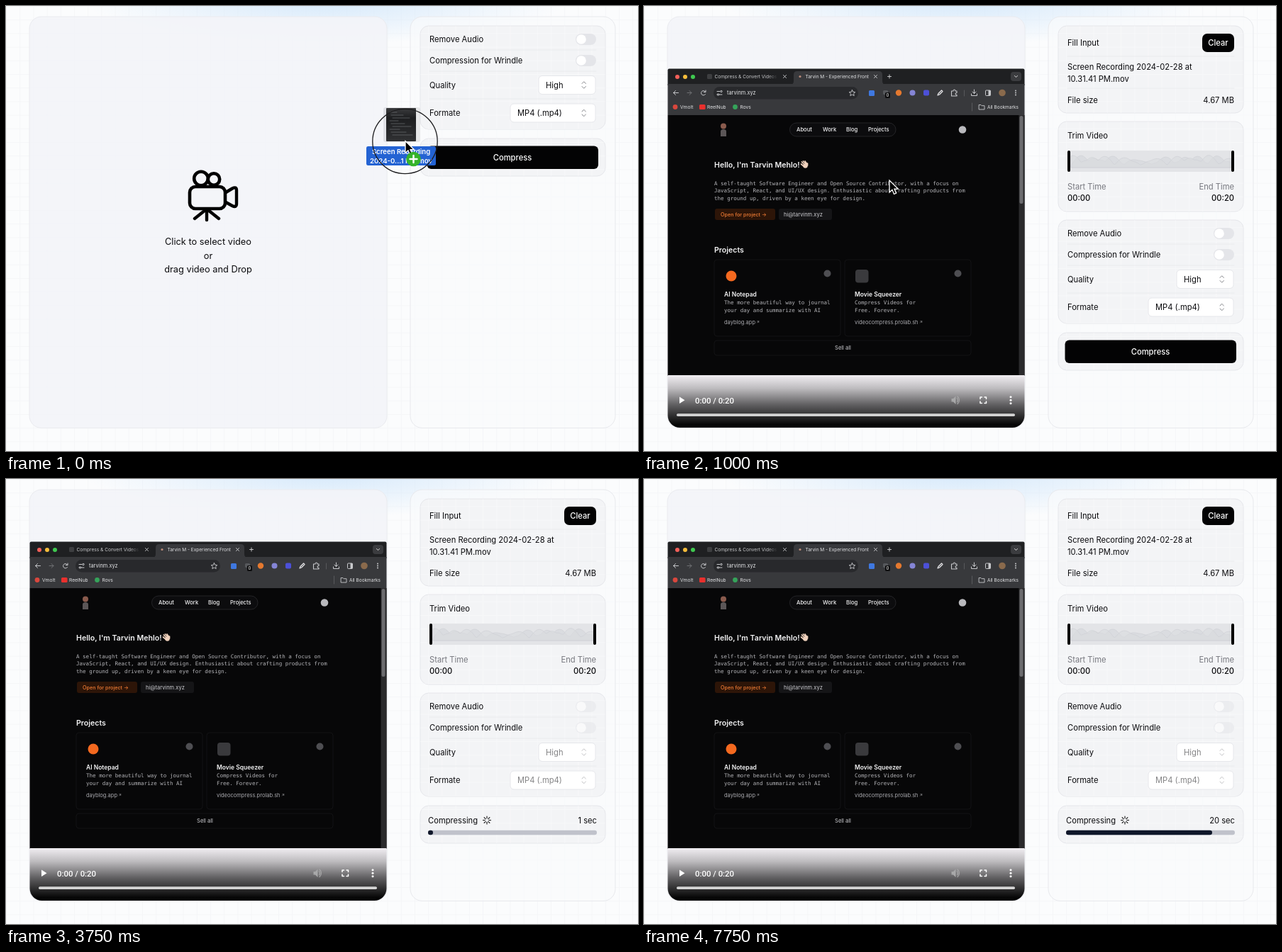
Recreate the animation shown at these times as an HTML page. Size 891x628 px, loop 8 s.

```html
<!DOCTYPE html>
<html lang="en">
<head>
<meta charset="utf-8">
<title>Video compressor</title>
<style>
  html, body { margin: 0; width: 100%; height: 100%; overflow: hidden; background: #fbfcfd; }
  svg { display: block; }
  text { font-family: Inter, sans-serif; white-space: pre; }
  .mono { font-family: "DejaVu Sans Mono", monospace; }
  .roboto { font-family: Roboto, sans-serif; }
</style>
</head>
<body>
<svg id="stage" width="891" height="628" viewBox="0 0 891 628"></svg>
<script>
const STEP = 250, LOOP = 8000;
const stage = document.getElementById('stage');

// Drawing helpers; text is placed by its vertical centre.
const attrs = o => Object.entries(o).map(([k, v]) => `${k}="${v}"`).join(' ');
const text = (x, y, str, size = 11.2, o = {}) =>
  `<text x="${x}" y="${y + size * .36}" font-size="${size}" ${attrs({ fill: '#0b0b0e', ...o })}>${str.replace(/&/g, '&amp;')}</text>`;
const box = (x, y, x2, y2, r, fill, o = {}) =>
  `<rect x="${x}" y="${y}" width="${x2 - x}" height="${y2 - y}" rx="${r}" fill="${fill}" ${attrs(o)}/>`;
const dot = (x, y, r, fill, o = {}) => `<circle cx="${x}" cy="${y}" r="${r}" fill="${fill}" ${attrs(o)}/>`;
const line = (d, stroke = '#c8c9cc', width = 1, o = {}) =>
  `<path d="${d}" fill="none" stroke="${stroke}" stroke-width="${width}" stroke-linecap="round" stroke-linejoin="round" ${attrs(o)}/>`;
const group = (id, body, o = {}) => `<g id="${id}" ${attrs(o)}>${body}</g>`;
const rule = y => line(`M597 ${y}H832`, '#e6e7ea', .8);
const card = (y, y2) => box(584, y, 845, y2, 12, '#f3f4f6', { 'fill-opacity': .85, stroke: '#e6e7eb' }) +
  box(584, y, 845, y2, 12, 'url(#cardGrid)');
const end = { 'text-anchor': 'end' }, middle = { 'text-anchor': 'middle' };
const semi = { 'font-weight': 600 }, medium = { 'font-weight': 500 };

const defs = `<defs>
  <radialGradient id="sky"><stop stop-color="#d6e9fb"/><stop offset="1" stop-color="#d6e9fb" stop-opacity="0"/></radialGradient>
  <radialGradient id="glow" cx=".5" cy="1.1" r=".3" gradientTransform="translate(0 .2)">
    <stop stop-color="#55565a"/><stop offset="1" stop-color="#030304"/></radialGradient>
  <linearGradient id="fade" x2="0" y2="1"><stop stop-color="#f1eef2"/><stop offset=".25" stop-color="#bdbbbe"/>
    <stop offset=".55" stop-color="#626163"/><stop offset=".93" stop-color="#060606"/><stop offset="1"/></linearGradient>
  <linearGradient id="thumb" x2="0" y2="1"><stop stop-color="#3b3c3e"/><stop offset=".3" stop-color="#1d1e20"/><stop offset="1" stop-color="#303133"/></linearGradient>
  <linearGradient id="tabFade"><stop offset=".85" stop-color="#1f2022" stop-opacity="0"/><stop offset="1" stop-color="#1f2022"/></linearGradient>
  <pattern id="grid" width="19.2" height="19.2" patternUnits="userSpaceOnUse"><path d="M0 .5H19.2M.5 0V19.2" stroke="#f5f6f8"/></pattern>
  <pattern id="cardGrid" width="19.2" height="19.2" patternUnits="userSpaceOnUse"><path d="M0 .5H19.2M.5 0V19.2" stroke="#fff" stroke-opacity=".35"/></pattern>
  <clipPath id="player">${box(33.5, 88.5, 536.5, 595, 17, '#000')}${box(33.5, 88.5, 536.5, 560, 2, '#000')}</clipPath>
</defs>`;

const page = box(0, 0, 891, 628, 0, '#fbfcfd') + box(0, 0, 891, 628, 0, 'url(#grid)') +
  '<ellipse cx="450" cy="-8" rx="340" ry="62" fill="url(#sky)"/>' +
  box(33, 15, 537, 595.5, 17, '#f4f5f9', { 'fill-opacity': .93, stroke: '#eaebef' }) +
  box(570, 15, 859, 595.5, 17, '#fafbfd', { 'fill-opacity': .7, stroke: '#e8e9ed' });

const dropZone = dot(275, 243.5, 9.8, 'none', { stroke: '#000', 'stroke-width': 4.6 }) +
  dot(293, 244.5, 8.2, 'none', { stroke: '#000', 'stroke-width': 4.6 }) +
  box(259, 255, 309, 286, 8, '#f4f5f9', { stroke: '#000', 'stroke-width': 4.6 }) +
  line('M310 263L319 257.500Q325 254.500 325 260V279Q325 285 319 282L310 277M283 287V302M281 288L266 300M285 288L300 300', '#000', 4.4) +
  text(285, 332, 'Click to select video', 12.8, middle) +
  text(285, 352, 'or', 12.8, middle) + text(285, 371, 'drag video and Drop', 12.8, middle);

const toggle = y => `<g class="dim">${box(803, y - 8, 832, y + 8, 8, '#e4e5e9')}${dot(811, y, 6.8, '#fff')}</g>`;
const select = (x, y, label) => box(x, y - 13, 831, y + 13, 5, '#fff', { stroke: '#e6e7eb' }) +
  `<g class="dim">${text(x + 10, y, label)}${line(`M812 ${y - 2}l2.700 -2.700 2.700 2.700M812 ${y + 2}l2.700 2.700 2.700 -2.700`, '#77787d', .9)}</g>`;
const settings = card(28, 174) + rule(62) + rule(92) + rule(131) +
  text(597, 47, 'Remove Audio') + toggle(47) +
  text(597, 77, 'Compression for Wrindle') + toggle(77) +
  text(597, 111.5, 'Quality') + select(751, 111.5, 'High') +
  text(597, 151, 'Formate') + select(711, 151, 'MP4 (.mp4)') + card(187, 240);
const button = box(593.5, 197.5, 835, 230, 6, 'url(#glow)') +
  text(714, 214, 'Compress', 11.2, { fill: '#fff', ...medium, ...middle });
const spokes = Array.from({ length: 8 }, (_, i) => line('M0 -2.700V-5.500', '#111', 1.1, { transform: `rotate(${i * 45})` })).join('');
const progress = text(595, 207.5, 'Compressing') +
  `<g transform="translate(678 207.500)">${group('spinner', spokes)}</g>` +
  text(833, 207.5, '0 sec', 11.2, { id: 'seconds', ...end }) +
  box(595, 221.7, 833, 228.3, 3.3, '#c0c2cb') + box(595, 221.7, 596, 228.3, 3.3, '#0f172a', { id: 'bar' });

const wave = (phase, color) => {
  let d = 'M602 228';
  for (let x = 0; x <= 226; x += 2)
    d += `L${602 + x} ${(225 - 7 * Math.abs(Math.sin(x * .083 + phase)) - 8 * Math.abs(Math.sin(x * .13 + phase) * Math.sin(x * .021 + 1))).toFixed(1)}`;
  return `<path d="${d}L828 228Z" fill="${color}" fill-opacity=".6" stroke="#cdcfd4" stroke-width=".6"/>`;
};
const details = card(28, 151) + rule(71) + rule(116) + text(597, 51.5, 'Fill Input') +
  box(787, 39, 832, 65, 7, 'url(#glow)') + text(809.5, 52, 'Clear', 11.2, { fill: '#fff', ...medium, ...middle }) +
  text(597, 86, 'Screen Recording 2024-02-28 at') + text(597, 102.5, '10.31.41 PM.mov') +
  text(597, 132.5, 'File size') + text(832, 132.5, '4.67 MB', 11.2, end) +
  card(163, 290) + text(597, 182.5, 'Trim Video') +
  box(597, 204, 832, 234, 4, '#e3e4e7') + wave(0, '#d6d8dc') + wave(1.3, '#dadce0') +
  box(597, 204, 601, 234, 2, '#000') + box(828, 204, 832, 234, 2, '#000') +
  text(597, 255, 'Start Time', 11.2, { fill: '#77787f' }) + text(832, 255, 'End Time', 11.2, { fill: '#77787f', ...end }) +
  text(597, 271, '00:00', 11.2, medium) + text(832, 271, '00:20', 11.2, { ...medium, ...end });

const pale = { fill: '#e2e3e5' };
const cross = x => line(`M${x - 2} 97.500l4 4m0 -4l-4 4`, '#d5d6d8', .9);
const chrome = box(33, 88, 537, 112, 0, '#1f2022') +
  ['#f4605a', '#f6bd3b', '#3fc950'].map((c, i) => dot(47 + i * 11, 100, 3, c)).join('') +
  box(89, 96, 96, 103, 1.5, '#3d3e40') + text(99.5, 99.5, 'Compress & Convert Videos', 6.6, { fill: '#c6c7c9' }) +
  box(99, 94, 188, 106, 0, 'url(#tabFade)') + cross(198.5) +
  `<path d="M206 111Q211 111 211 106V97Q211 92 216 92H331Q336 92 336 97V106Q336 111 341 111Z" fill="#38393c"/>` +
  dot(220, 99.5, 1.6, '#b98b7a') + text(227.5, 99.5, 'Tarvin M - Experienced Front', 6.5, pale) + cross(326.5) +
  line('M343.500 99.500h5m-2.500 -2.500v5', '#d5d6d8', .9) + box(517, 93, 532, 106, 4, '#3b3c3f') + line('M522.500 98.500l2 2 2 -2', '#ddd') +
  box(33, 110, 537, 154, 0, '#38393c') + box(98, 114, 302, 131.5, 8.5, '#28292c') +
  line('M48.500 122.500h-7m3 -3l-3 3 3 3') + line('M61 122.500h6m-3 -3l3 3 -3 3', '#707174') +
  line('M86.500 121A3.200 3.200 0 1 0 86.500 124.500M87 119v2.500h-2.500') +
  line('M103 120.500h4M103 125h1m2 0h4') + dot(109, 120.5, 1.2, 'none', { stroke: '#c8c9cc' }) + dot(104.5, 125, 1.2, 'none', { stroke: '#c8c9cc' }) +
  text(117, 122.5, 'tarvinm.xyz', 7.4, pale) +
  line('M293.500 118.500l1.300 2.800 3 .3 -2.200 2 .6 3 -2.700 -1.500 -2.700 1.500 .6 -3 -2.200 -2 3 -.3Z', '#c8c9cc', .9) +
  box(317, 119, 325, 127, 1.5, '#3f78e0') + box(337, 119, 344, 125, 1.5, '#56585c') + box(340, 122, 347, 130, 1.5, '#0d0d0e') +
  text(343.5, 126, '0', 6, { fill: '#fff', ...middle }) +
  dot(359, 122.5, 4.2, '#e5792f') + dot(378.5, 122.5, 4, '#8585d6') + box(394, 118.5, 402, 126.5, 2, '#4c50d8') +
  line('M414 126l1 -2.500 4.500 -4.500 1.500 1.500 -4.500 4.500Z', '#e8e8ea', 1.2) +
  line('M433.500 120h2.500q0 -2 1.500 -2t1.500 2h2v2.500q-2 0 -2 1.500t2 1.500v1.500h-7.500Z', '#c8c9cc', 1.1) +
  line('M451.500 119v8', '#58595c') + line('M465.500 118v5.500m-2.500 -2.500l2.500 2.500 2.500 -2.500M461.500 124v2.500h8v-2.500') +
  box(481.5, 119, 488.500, 126.5, 1, 'none', { stroke: '#c8c9cc' }) + box(485.5, 119, 488.5, 126.5, 0, '#c8c9cc') +
  dot(505, 122.5, 4.8, '#8a6a4c') + [119.5, 122.5, 125.5].map(y => dot(524, y, .9, '#d5d6d8')).join('') +
  dot(44, 142.5, 3.4, '#d9473d') + text(51, 142.5, 'Vmolt', 6.7, pale) +
  box(78, 139, 86.500, 146, 1.5, '#e9302d') + text(89, 142.5, 'ReelNub', 6.7, pale) +
  dot(128.500, 142.5, 3.4, '#35a35a') + text(135.5, 142.5, 'Rovs', 6.7, pale) +
  line('M462.500 137v11', '#58595c') + line('M472.500 139.500h2.500l1 1.200h4v5.300h-7.500Z', '#c8c9cc', .9) +
  text(528, 142.5, 'All Bookmarks', 6.5, { ...pale, ...end });

const light = { fill: '#f4f4f5' }, dim = { fill: '#a9a9ae' };
const mono = (x, y, str) => text(x, y, str, 7.54, { class: 'mono', fill: '#b4b4b8' });
const frameBox = (x, y, x2, y2) => box(x, y, x2, y2, 4, 'none', { stroke: '#121214' });
const link = (x, y, str, arrowX) => text(x, y, str, 7.5, dim) +
  line(`M${arrowX} ${y + 1}l2.200 -2.200m-1.800 0h1.800v1.800`, '#a9a9ae', .6);
const website = box(33, 154, 537, 522, 0, '#070708') + box(528.5, 154, 537, 522, 0, '#2a2a2c') + box(529.5, 155, 534.5, 279, 2.5, '#6c6c6f') +
  dot(112, 169.5, 4, '#8a5b4d') + '<path d="M108 184V177Q108 174 112 174T116 177V184Z" fill="#5b5657"/>' +
  box(205.5, 165, 355, 184, 9.5, '#0c0c0e', { stroke: '#242427' }) +
  [[215, 'About'], [252, 'Work'], [285, 'Blog'], [316, 'Projects']].map(([x, s]) => text(x, 174.5, s, 7.6, { ...light, ...medium })).join('') +
  dot(449, 174.5, 5.3, '#b9b9bd') +
  text(99, 224, "Hello, I'm Tarvin Mehlo!", 10.6, { ...light, ...semi }) +
  line('M222.500 220l4 4.500M224.500 219l3.500 4M227 219l2.500 3.500M221.500 223l3.500 3M230.500 222v3', '#f1d2bd', 1.7) + dot(227.5, 225.5, 3.2, '#f1d2bd') +
  mono(99, 250, 'A self-taught Software Engineer and Open Source Contributor, with a focus on') +
  mono(99, 260.5, 'JavaScript, React, and UI/UX design. Enthusiastic about crafting products from') +
  mono(99, 271.5, 'the ground up, driven by a keen eye for design.') +
  box(100, 286, 185, 302, 3, '#2d1508') + text(108, 294, 'Open for project →', 7.2, { fill: '#ee7b34', ...medium }) +
  box(190, 286, 265, 302, 3, '#151517') + text(197, 294, 'hi@tarvinm.xyz', 7.5, { fill: '#cfcfd3' }) +
  text(99, 344, 'Projects', 10.6, { ...light, ...semi }) +
  frameBox(99, 358, 277, 466) + frameBox(283, 358, 461, 466) + frameBox(99, 472, 461, 493) +
  dot(123, 381, 7.5, '#f4691f') + box(298, 372, 316.5, 390.5, 4, '#3a3a3d') +
  dot(258.5, 377.5, 5, '#4e4e52') + dot(442.5, 377.5, 5, '#4e4e52') +
  text(113, 406.5, 'AI Notepad', 8.5, { ...light, ...semi }) + text(297, 406.5, 'Movie Squeezer', 8.5, { ...light, ...semi }) +
  mono(113, 418, 'The more beautiful way to journal') + mono(113, 429, 'your day and summarize with AI') +
  mono(297, 418, 'Compress Videos for') + mono(297, 429, 'Free. Forever.') +
  link(113, 446, 'dayblog.app', 159.5) + link(297, 446, 'videocompress.prolab.sh', 389.5) +
  text(280.5, 482.5, 'Sell all', 7.5, { fill: '#cfcfd3', ...middle });

const controls = box(33, 521, 537, 596, 0, 'url(#fade)') + '<path d="M50 551.500L57.500 556.200 50 561Z" fill="#fff"/>' +
  text(72, 556.5, '0:00 / 0:20', 11.4, { class: 'roboto', fill: '#fff', ...medium }) +
  '<path d="M433.500 554h2.500l3.500 -3.500v11.500l-3.500 -3.500h-2.500Z" fill="#a8a8a9"/>' +
  line('M441.500 553.500q2 2.700 0 5.500M442 551q5 5 0 10.500', '#a8a8a9', 1.2) +
  line('M474 554.500v-2.500h2.500m3.500 0h2.500v2.500m0 3.500v2.500h-2.500m-3.500 0h-2.500v-2.500', '#fff', 1.5) +
  [551.7, 556.2, 560.7].map(y => dot(517, y, 1.5, '#fff')).join('') + box(46, 575.3, 523, 579, 1.8, '#d3d3d3');
const player = `<g clip-path="url(#player)">${chrome}${website}${controls}</g>`;

// Dragged file, relative to the top left corner of its thumbnail.
const thumbLines = Array.from({ length: 9 }, (_, i) =>
  line(`M${5 + i % 3 * 2} ${6 + i * 4}h${10 + i * 7 % 19}`, '#77797c', .6)).join('');
const file = box(-4, -1, 48, 48, 3, '#55575c', { 'fill-opacity': .12 }) + box(0, 0, 42, 47, 1, 'url(#thumb)') + thumbLines +
  box(-28, 54, 70, 81, 2.5, '#2463d3') +
  text(21, 61.5, 'Screen Recording', 9.6, { fill: '#fff', ...semi, ...middle }) +
  text(21, 74.5, '2024-0...1 PM.mov', 9.6, { fill: '#fff', ...semi, ...middle });
const badge = dot(11.5, 25.5, 10.3, '#35b32a') + line('M11.500 20.500v10m-5 -5h10', '#fff', 2.4);
const arrow = '<path d="M0 0V17L3.900 13.300 6.500 19.500 9.600 18.200 7 12.200H12.300Z" fill="#000" stroke="#fff" stroke-width="1.300"/>';
const hand = '<path d="M-1.500 .500Q0 -1.500 1.700 .500L3.400 7 9 7.500Q11.500 8 11.500 11L11 16 9.500 19H1.500L-4 11.500Q-4.500 9 -2 9.500L.500 11.500Z" fill="#fff" stroke="#111" stroke-width="1.200"/>' +
  line('M4.500 12v4m2.300 -4v4m2.300 -4v4', '#111', .9);

stage.innerHTML = defs + page + group('dropZone', dropZone) + group('loaded', player + details) +
  group('settings', settings + group('button', button) + group('progress', progress)) +
  group('file', file) + dot(0, 0, 46, 'none', { id: 'ring', stroke: '#1c1c1e', 'stroke-width': 1.3 }) +
  group('arrow', arrow) + group('badge', badge) + group('hand', hand);

const el = id => document.getElementById(id);
const show = (id, on) => el(id).setAttribute('display', on ? 'inline' : 'none');
const move = (id, x, y) => el(id).setAttribute('transform', `translate(${x} ${y})`);
const mix = (a, b, u) => a + (b - a) * u;
const clamp = u => Math.min(1, Math.max(0, u));
const smooth = u => u * u * (3 - 2 * u);
function track(t, keys) {
  const i = keys.findIndex(k => k[0] >= t);
  if (i < 0) return keys[keys.length - 1][1];
  if (i === 0) return keys[0][1];
  const [a, b] = [keys[i - 1], keys[i]];
  return mix(a[1], b[1], (t - a[0]) / (b[0] - a[0]));
}
const secondsKeys = [[2250, 0], [3750, 1], [5250, 3], [7500, 20], [7750, 20.9]];
const barKeys = [[2250, 0], [3750, 7], [5250, 23], [7750, 206]];

function draw(t) {
  const dragging = t < 1000, pressing = t === 2000, compressing = t >= 2250;
  const drag = clamp(t / 750), travel = smooth(clamp((t - 1000) / 1000));
  const x = dragging ? mix(563, 346, drag) : mix(346, 764, travel);
  const y = dragging ? mix(190.5, 246, drag) : mix(246, 495, travel);

  show('dropZone', dragging);
  show('loaded', !dragging);
  move('settings', 0, dragging ? 0 : 274);
  show('button', !compressing);
  show('progress', compressing);
  document.querySelectorAll('.dim').forEach(e => e.setAttribute('opacity', compressing ? .5 : 1));

  show('file', dragging);
  show('badge', dragging);
  show('arrow', t <= 2250 && !pressing);
  show('hand', pressing);
  show('ring', dragging || pressing);
  el('ring').setAttribute('r', pressing ? 36.5 : 45.7);
  move('ring', pressing ? 759.5 : x - .5, pressing ? 491 : y + .5);
  move('file', mix(536, 315, drag), mix(144, 203, drag));
  ['badge', 'arrow', 'hand'].forEach(id => move(id, x, y));

  el('seconds').textContent = `${Math.floor(track(t, secondsKeys))} sec`;
  el('bar').setAttribute('width', track(t, barKeys));
  el('spinner').setAttribute('transform', `rotate(${t * .36})`);
}

function tick() {
  draw(Math.floor(performance.now() % LOOP / STEP) * STEP);
  requestAnimationFrame(tick);
}
tick();
</script>
</body>
</html>
```
